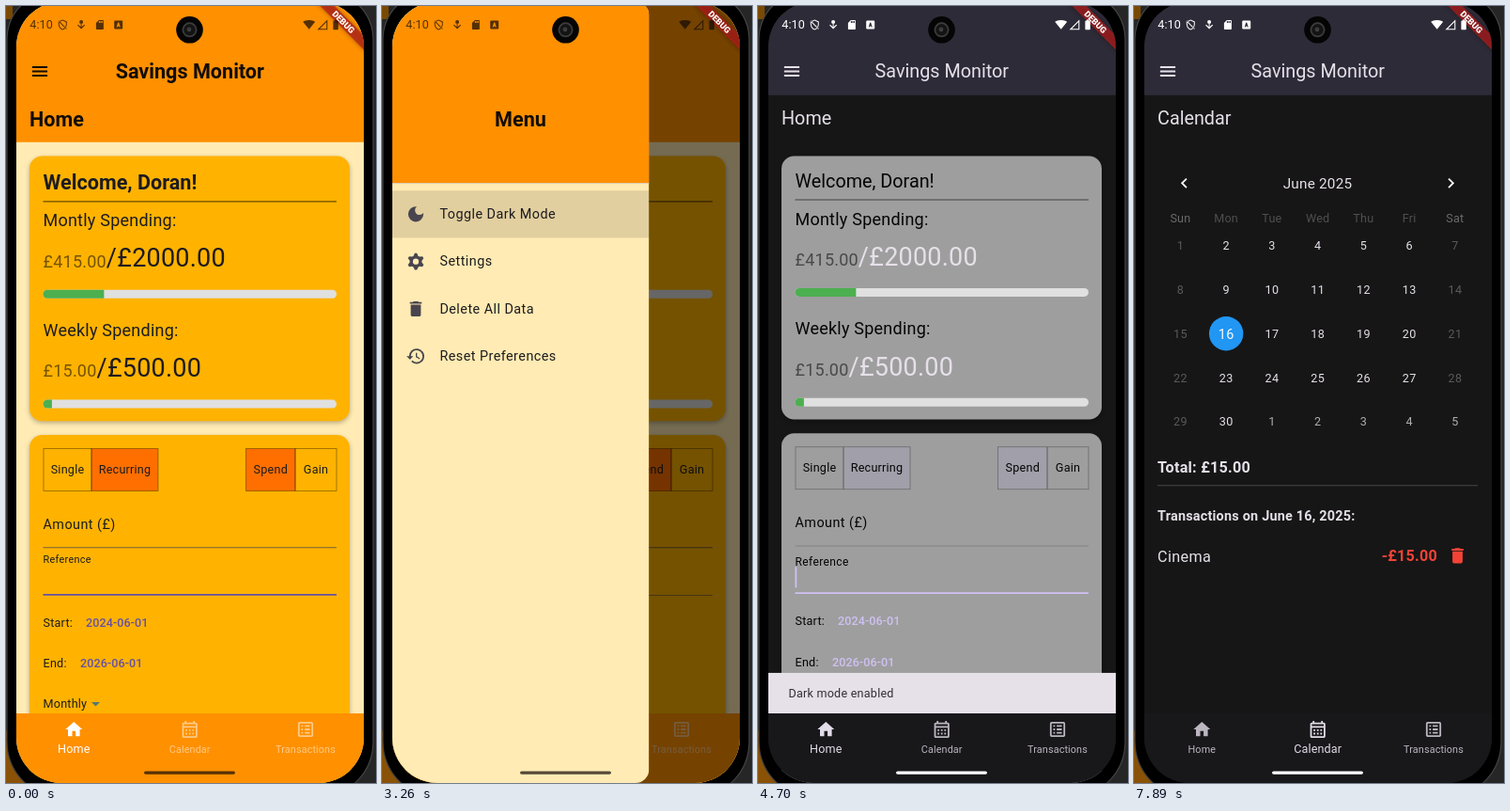
Write an HTML page with a canvas that moves like this. It is 394x826 px and loops after 8000 ms.

```html
<!DOCTYPE html>
<html lang="en">
<head>
<meta charset="utf-8">
<title>Budget app</title>
<style>
  html, body { margin: 0; width: 100%; height: 100%; overflow: hidden; background: #000; }
  canvas { display: block; width: 100vw; height: 100vh; }
</style>
</head>
<body>
<canvas id="stage"></canvas>
<script>
const W = 394, H = 826, LOOP = 8000;
const SCREEN = { x: 11, y: -4.5, w: 370, h: 830.5 };
const canvas = document.getElementById('stage');
const ctx = canvas.getContext('2d');
const ratio = window.devicePixelRatio || 1;
canvas.width = W * ratio;
canvas.height = H * ratio;

// Icons on a 24-unit grid
const gear = Array.from({ length: 24 }, (_, i) => {
  const angle = (i - 0.5) * Math.PI / 12, r = i % 4 < 2 ? 10 : 7.2;
  return `${12 + r * Math.sin(angle)} ${12 - r * Math.cos(angle)}`;
}).join('L');
const ICONS = {
  menu: 'M3 18h18v-2H3zm0-5h18v-2H3zm0-7v2h18V6z',
  home: 'M10 20v-6h4v6h5v-8h3L12 3 2 12h3v8z',
  calendar: 'M19 4h-1V2h-2v2H8V2H6v2H5c-1.1 0-2 .9-2 2v14c0 1.1.9 2 2 2h14c1.1 0 2-.9 2-2V6c0-1.1-.9-2-2-2zm0 16H5V10h14zm0-12H5V6h14zM9 14H7v-2h2zm4 0h-2v-2h2zm4 0h-2v-2h2zm-8 4H7v-2h2zm4 0h-2v-2h2zm4 0h-2v-2h2z',
  list: 'M19 5v14H5V5h14m0-2H5a2 2 0 0 0-2 2v14a2 2 0 0 0 2 2h14a2 2 0 0 0 2-2V5a2 2 0 0 0-2-2zM11 7h6v2h-6zm0 4h6v2h-6zm0 4h6v2h-6zM7 7h2v2H7zm0 4h2v2H7zm0 4h2v2H7z',
  moon: 'M12 3a9 9 0 1 0 9 9c0-.46-.04-.92-.1-1.36a5.39 5.39 0 0 1-4.4 2.26 5.4 5.4 0 0 1-3.14-9.8C12.92 3.04 12.46 3 12 3z',
  gear: `M${gear}zM12 8.5a3.5 3.5 0 1 0 0 7 3.5 3.5 0 0 0 0-7z`,
  trash: 'M6 19c0 1.1.9 2 2 2h8c1.1 0 2-.9 2-2V7H6zM19 4h-3.5l-1-1h-5l-1 1H5v2h14z',
  history: 'M13 3a9 9 0 0 0-9 9H1l3.89 3.89.07.14L9 12H6a7 7 0 1 1 2.06 4.94l-1.42 1.42A9 9 0 1 0 13 3zm-1 5v5l4.28 2.54.72-1.21-3.5-2.08V8z',
  left: 'M15.41 7.41L14 6l-6 6 6 6 1.41-1.41L10.83 12z',
  right: 'M10 6L8.59 7.41 13.17 12l-4.58 4.59L10 18l6-6z',
  smile: 'M12 2a10 10 0 1 0 0 20 10 10 0 0 0 0-20zm0 18a8 8 0 1 1 0-16 8 8 0 0 1 0 16zM8.5 8a1.5 1.5 0 1 0 0 3 1.5 1.5 0 0 0 0-3zm7 0a1.5 1.5 0 1 0 0 3 1.5 1.5 0 0 0 0-3zM12 17.5c2.3 0 4.3-1.5 5.1-3.5H6.9c.8 2 2.8 3.5 5.1 3.5z',
  check: 'M9 16.17L4.83 12l-1.42 1.41L9 19 21 7l-1.41-1.41z',
  erase: 'M22 3H7c-.7 0-1.2.35-1.6.9L0 12l5.4 8.1c.4.5.9.9 1.6.9h15a2 2 0 0 0 2-2V5a2 2 0 0 0-2-2zm0 16H7.07L2.4 12l4.66-7H22zM10.4 17L14 13.4l3.6 3.6 1.4-1.4-3.6-3.6L19 8.4 17.6 7 14 10.6 10.4 7 9 8.4l3.6 3.6L9 15.6z',
  mic: 'M12 14c1.66 0 3-1.34 3-3V5a3 3 0 0 0-6 0v6c0 1.66 1.34 3 3 3zm5-3a5 5 0 0 1-10 0H5a7 7 0 0 0 6 6.92V21h2v-3.08A7 7 0 0 0 19 11z',
  shield: 'M12 1L3 5v6c0 5.5 3.8 10.7 9 12 5.2-1.3 9-6.5 9-12V5zm0 2.2l7 3.1V11c0 4.5-3 8.7-7 9.9-4-1.2-7-5.4-7-9.9V6.3zM4 3L21 20l-1.4 1.4L2.6 4.4z',
  anchor: 'M12 2a4 4 0 1 0 0 8 4 4 0 0 0 0-8zM4 13l8 8 8-8-1.6-1.6L13 16.5V10h-2v6.5l-5.4-5.1z',
  card: 'M18 2h-8L4 8v12c0 1.1.9 2 2 2h12c1.1 0 2-.9 2-2V4c0-1.1-.9-2-2-2zm-6 6h-2V4h2zm3 0h-2V4h2zm3 0h-2V4h2z',
  letter: 'M5 3h14a2 2 0 0 1 2 2v14a2 2 0 0 1-2 2H5a2 2 0 0 1-2-2V5a2 2 0 0 1 2-2zM8 17h2l.7-2h2.6l.7 2h2L13 7h-2z',
  wifi: 'M12 21L24 6.4C23.5 6 18.9 3 12 3S.5 6 0 6.4z',
  signal: 'M2 22h20V2zM20 7v13H7z',
  battery: 'M15.67 4H14V2h-4v2H8.33C7.6 4 7 4.6 7 5.33v15.33C7 21.4 7.6 22 8.33 22h7.33c.74 0 1.34-.6 1.34-1.33V5.33C17 4.6 16.4 4 15.67 4z'
};
for (const name in ICONS) ICONS[name] = new Path2D(ICONS[name]);

const LIGHT = {
  bar: '#ff9000', page: '#ffebb3', card: '#ffb300', ink: '#1d1b20', heading: '#120d05',
  amount: '#1d1b20', primary: '#6750a4', line: 'rgba(73,69,79,.75)', picked: '#ff6f00',
  border: 'rgba(60,40,0,.5)', nav: '#ff9000', navOn: '#fff', navOff: 'rgba(255,255,255,.52)',
  weight: 700, title: 21.6, shift: 0
};
const DARK = {
  bar: '#2e2b38', page: '#161616', card: '#9e9e9e', ink: '#050505', heading: '#e6e0e9',
  amount: '#e6e0e9', primary: '#cfc0f2', line: '#838383', picked: '#a19fa9',
  border: '#707070', nav: '#18171a', navOn: '#e2dce8', navOff: '#bbb6c0',
  weight: 400, title: 19.8, shift: -1.8
};
const VEILED = { ...DARK, bar: '#02021c', page: '#02021c', nav: '#02021c' };

const clamp = v => Math.min(1, Math.max(0, v));
const ramp = (v, from, to) => clamp((v - from) / (to - from));
const lerp = (a, b, p) => a + (b - a) * p;
const mix = (a, b, p) => `rgb(${a.map((v, i) => Math.round(lerp(v, b[i], p)))})`;
const spring = n => n > 5 ? 0 : (1 + 1.55 * n) * Math.exp(-1.55 * n);

function rect(x, y, w, h, color, radius = 0) {
  ctx.fillStyle = color;
  ctx.beginPath();
  ctx.roundRect(x, y, w, h, radius);
  ctx.fill();
}
function disc(x, y, r, color) {
  ctx.fillStyle = color;
  ctx.beginPath();
  ctx.arc(x, y, r, 0, 7);
  ctx.fill();
}
// y is the middle of the capitals
function text(str, x, y, size, color, { weight = 400, spacing = 0.225, align = 'left' } = {}) {
  ctx.font = `${weight} ${size}px Roboto, sans-serif`;
  ctx.letterSpacing = spacing + 'px';
  ctx.textAlign = align;
  ctx.fillStyle = color;
  ctx.fillText(str, x, y + size * 0.35);
}
function icon(name, x, y, color, size = 21.6) {
  ctx.save();
  ctx.translate(x - size / 2, y - size / 2);
  ctx.scale(size / 24, size / 24);
  ctx.fillStyle = color;
  ctx.fill(ICONS[name]);
  ctx.restore();
}

function drawBezel() {
  rect(0, 0, W, H, '#262626');
  rect(0, 0, 7, 14, '#7a4a05');
  rect(0, 770, 30, 56, '#8a5206');
  rect(1, -16, 390, 858, '#000', [52, 52, 60, 60]);
  ctx.strokeStyle = '#444';
  ctx.lineWidth = 1.2;
  ctx.stroke();
}

function drawCard(y, h, theme) {
  ctx.save();
  ctx.shadowColor = 'rgba(0,0,0,.28)';
  ctx.shadowBlur = 5 * ratio;
  ctx.shadowOffsetY = 2 * ratio;
  rect(25, y, 341, h, theme.card, 13.5);
  ctx.restore();
}

function drawSpending(label, spent, limit, share, y, theme) {
  text(label, 39.5, y, 18, theme.ink);
  text(spent, 39.5, y + 43.2, 18, 'rgba(0,0,0,.54)');
  const width = ctx.measureText(spent).width;
  text('/' + limit, 39.5 + width, y + 40, 27, theme.amount);
  rect(39.5, y + 73.7, 312.5, 9, '#e0e0e0', 4.5);
  rect(39.5, y + 73.7, 312.5 * share, 9, '#4caf50', [4.5, 0, 0, 4.5]);
}

function drawToggle(x, split, end, y, labels, picked, theme) {
  const edges = [x, split, end];
  rect(edges[picked], y, edges[picked + 1] - edges[picked], 45, theme.picked);
  ctx.strokeStyle = theme.border;
  ctx.lineWidth = 0.9;
  ctx.strokeRect(x, y, split - x, 45);
  ctx.strokeRect(split, y, end - split, 45);
  labels.forEach((s, i) =>
    text(s, (edges[i] + edges[i + 1]) / 2, y + 22.3, 12.6, theme.ink, { align: 'center' }));
}

function drawHome(theme, state) {
  const d = theme.shift;
  drawCard(159.5, 281.7 + d, theme);
  text('Welcome, Doran!', 39.5, 187 + d / 2, theme.title, theme.ink, { weight: theme.weight, spacing: 0 });
  rect(39.5, 207.3 + d, 312.5, 1.1, 'rgba(0,0,0,.58)');
  drawSpending('Montly Spending:', '£415.00', '£2000.00', 0.2075, 228 + d, theme);
  drawSpending('Weekly Spending:', '£15.00', '£500.00', 0.03, 344.9 + d, theme);

  drawCard(456 + d, 400, theme);
  drawToggle(40, 91, 162, 470.5 + d, ['Single', 'Recurring'], 1, theme);
  drawToggle(255.5, 308, 352, 470.5 + d, ['Spend', 'Gain'], 0, theme);
  text('Amount (£)', 39.5, 551 + d, 14.4, theme.ink, { spacing: 0.45 });
  rect(39.5, 575.3 + d, 312.5, 0.9, theme.line);
  const f = state.labelFloat;
  text('Reference', 39.5, lerp(601, 588.7, f) + d, lerp(14.4, 10.8, f), theme.ink, { spacing: lerp(0.45, 0.34, f) });
  if (state.focused) rect(39.5, 625 + d, 312.5, 1.8, theme.primary);
  else rect(39.5, 625.9 + d, 312.5, 0.9, theme.line);
  if (state.cursor) rect(39.5, 598 + d, 1.8, 22, theme.primary);
  const date = { weight: 500, spacing: 0.09 };
  text('Start:', 39.5, 655.7 + d, 12.6, theme.ink);
  text('2024-06-01', 85, 655.7 + d, 12.6, theme.primary, date);
  text('End:', 39.5, 699 + d, 12.6, theme.ink);
  text('2026-06-01', 79, 699 + d, 12.6, theme.primary, date);
  text('Monthly', 39.5, 742 + d, 12.6, theme.ink);
  ctx.fillStyle = '#58786c';
  ctx.fill(new Path2D(`M91 ${740 + d}h9l-4.5 4.5z`));
}

function drawCalendar() {
  const center = { align: 'center' };
  const column = i => 49.4 + 48.75 * i;
  icon('left', 53.5, 188.3, '#fff');
  icon('right', 337.5, 188.3, '#fff');
  text('June 2025', 195.5, 188.3, 15.3, '#e6e0e9', center);
  ['Sun', 'Mon', 'Tue', 'Wed', 'Thu', 'Fri', 'Sat'].forEach((day, i) =>
    text(day, column(i), 226, 12.6, i % 6 ? '#4f4f4f' : '#6a6a6a', center));
  for (let i = 0; i < 35; i++) {
    const x = column(i % 7), y = 255 + 46.75 * Math.floor(i / 7);
    const weekend = i % 7 % 6 === 0, today = i === 15;
    if (today) disc(x, y - 0.3, 18.2, '#2196f3');
    const color = today ? '#fafafa' : i > 29 ? '#aeaeae' : weekend ? '#5a5a5a' : '#e6e0e9';
    text(i % 30 + 1, x, y, today ? 14.4 : 12.6, color, center);
  }
  text('Total: £15.00', 25, 490.8, 16.2, '#e6e0e9', { weight: 700 });
  rect(25, 509.2, 341, 1, '#49464c');
  text('Transactions on June 16, 2025:', 25, 541.8, 14.4, '#e6e0e9', { weight: 700 });
  text('Cinema', 25, 585, 16.2, '#e6e0e9', { spacing: 0.35 });
  text('-£15.00', 323, 584.3, 16.2, '#f44336', { weight: 700, align: 'right' });
  icon('trash', 344.5, 584.3, '#f44336');
}

function drawNav(theme, state) {
  rect(11, 752, 370, 74, theme.nav);
  if (state.ripple > 0) {
    ctx.save();
    ctx.beginPath();
    ctx.rect(11, 752, 370, 74);
    ctx.clip();
    ctx.globalAlpha = state.ripple;
    disc(196, 779, 31.5, 'rgba(255,255,255,.13)');
    const glow = ctx.createRadialGradient(207, 773, 0, 207, 773, 23);
    glow.addColorStop(0, 'rgba(255,255,255,.26)');
    glow.addColorStop(1, 'rgba(255,255,255,0)');
    disc(207, 773, 23, glow);
    ctx.restore();
  }
  [['home', 'Home', 72.3], ['calendar', 'Calendar', 195.7], ['list', 'Transactions', 319]].forEach(([glyph, label, x], i) => {
    const on = [1 - state.tab, state.tab, 0][i];
    const color = on > 0.5 ? theme.navOn : theme.navOff;
    icon(glyph, x, 769, color);
    text(label, x, lerp(790.3, 789.2, on), lerp(10.8, 12.6, on), color, { spacing: 0.13, align: 'center' });
  });
}

function drawDrawer(state) {
  const { open, morph, dark } = state;
  const width = 273.4;
  ctx.save();
  ctx.translate((open - 1) * width, 0);
  ctx.beginPath();
  ctx.roundRect(11, SCREEN.y, width, SCREEN.h, [0, 14.4, 14.4, 0]);
  ctx.clip();
  rect(11, -5, width, 832, dark ? '#1e1c22' : '#ffebb3');
  rect(11, -5, width, 193.3, mix([255, 144, 0], [22, 22, 22], morph));
  rect(11, 188, width, 0.9, mix([225, 205, 180], [73, 69, 79], morph));
  const theme = dark ? DARK : LIGHT;
  text('Menu', 147.5, dark ? 119.3 : 120, theme.title, theme.heading, { weight: theme.weight, spacing: 0, align: 'center' });
  if (state.press > 0) rect(11, 196.2, width, 50.4, `rgba(${dark ? '215,215,215' : '120,110,90'},${0.37 * state.press})`);
  const ink = mix([29, 27, 32], [230, 224, 233], morph);
  [['moon', 'Toggle Dark Mode'], ['gear', 'Settings'], ['trash', 'Delete All Data'], ['history', 'Reset Preferences']].forEach(([glyph, label], i) => {
    const y = 221.3 + 50.35 * i;
    icon(glyph, 36, y, dark ? '#d6d0d9' : '#49454f');
    text(label, 61.4, y - 0.3, 14.4, ink, { spacing: 0.45 });
  });
  ctx.restore();
}

function drawToolbar(shown) {
  const y = 777.5 + (1 - shown) * 80;
  ctx.save();
  ctx.shadowColor = 'rgba(0,0,0,.4)';
  ctx.shadowBlur = 3 * ratio;
  rect(78, y - 25.5, 236, 51, '#fbfaff', 25.5);
  ctx.restore();
  disc(195.6, y, 19.8, '#d9e2ff');
  ['menu', 'smile', 'check', 'erase', 'mic'].forEach((name, i) => icon(name, 102.5 + 46.6 * i, y, '#2b2d35'));
}

function drawBanner() {
  ctx.save();
  ctx.translate(381, SCREEN.y);
  ctx.rotate(Math.PI / 4);
  ctx.shadowColor = 'rgba(0,0,0,.5)';
  ctx.shadowBlur = 5 * ratio;
  rect(-40, 25.2, 80, 10.8, 'rgba(183,28,28,.7)');
  ctx.shadowColor = 'transparent';
  text('DEBUG', 0, 30.6, 9.2, '#fff', { weight: 900, spacing: 0, align: 'center' });
  ctx.restore();
}

function drawSystem(white) {
  const color = white ? '#fff' : 'rgba(20,12,8,.72)';
  text('4:10', 25.2, 20, 12.6, color, { spacing: 0.1 });
  ['shield', 'anchor', 'card', 'letter'].forEach((name, i) => icon(name, 60.3 + 19.8 * i, 20, color, 12));
  ['wifi', 'signal', 'battery'].forEach((name, i) => icon(name, 322.7 + 14.2 * i, 19.8, color, 13));
  rect(147, 813.4, 97, 3.4, color, 1.7);
  disc(195.5, 25.3, 14.3, '#050505');
  disc(195.5, 25.3, 8, '#3c3c3c');
  disc(195.5, 25.3, 6.2, '#141414');
  disc(195, 25, 2.4, '#3a3d3c');
}

function draw(time) {
  // Motion advances in steps of 1/15 s
  const k = Math.floor(time * 0.015 + 0.35);
  const within = (a, b) => k >= a && k < b;
  const state = {
    dark: k >= 50,
    open: k < 22 ? 0 : k < 65 ? 1 - spring(k - 21) : spring(k - 64),
    morph: ramp(k, 49.4, 53.2),
    press: k < 49 ? 0 : k === 49 ? 0.6 : 1 - ramp(k, 51, 56),
    focused: k < 22 || within(69, 91),
    labelFloat: Math.max(1 - ramp(k, 21, 24), ramp(k, 68, 71) - ramp(k, 90, 93)),
    cursor: within(7, 15) || within(70, 78) || within(85, 91),
    toolbar: ramp(k, 71, 76) - ramp(k, 90, 95),
    snack: ramp(k, 49, 51) - ramp(k, 111, 115),
    tab: ramp(k, 111, 115),
    ripple: k < 110 ? 0 : 1 - ramp(k, 111, 118)
  };
  const onCalendar = k >= 112;
  const theme = !state.dark ? LIGHT : state.open > 0 ? VEILED : DARK;

  ctx.setTransform(canvas.width / W, 0, 0, canvas.height / H, 0, 0);
  drawBezel();
  ctx.save();
  ctx.beginPath();
  ctx.roundRect(SCREEN.x, SCREEN.y, SCREEN.w, SCREEN.h, 48);
  ctx.clip();

  rect(11, -5, 370, 832, theme.page);
  if (onCalendar) drawCalendar();
  else drawHome(theme, state);
  rect(11, -5, 370, state.dark ? 99.7 : 149.8, theme.bar);
  icon('menu', 36, 69.5, theme.heading);
  const bold = { weight: theme.weight, spacing: 0 };
  text('Savings Monitor', 195.8, 69.5, theme.title, theme.heading, { ...bold, align: 'center' });
  text(onCalendar ? 'Calendar' : 'Home', 25, state.dark ? 119.3 : 120, theme.title, theme.heading, bold);
  drawNav(theme, state);

  if (state.snack > 0) {
    const bottom = Math.min(752, 826 - 80 * state.toolbar), height = 43.2 * state.snack;
    ctx.save();
    ctx.beginPath();
    ctx.rect(11, bottom - height, 370, height);
    ctx.clip();
    rect(11, bottom - height, 370, height, '#e6e0e9');
    text('Dark mode enabled', 32.4, bottom - height + 21.4, 12.6, '#322f35');
    ctx.restore();
  }
  if (state.open > 0) {
    rect(11, -5, 370, 832, `rgba(0,0,0,${0.54 * state.open})`);
    drawDrawer(state);
  }
  drawBanner();
  if (state.toolbar > 0) drawToolbar(state.toolbar);
  drawSystem(k >= 53);
  ctx.restore();
}

const start = performance.now();
function tick() {
  draw((performance.now() - start) % LOOP);
  requestAnimationFrame(tick);
}
tick();
</script>
</body>
</html>
```
